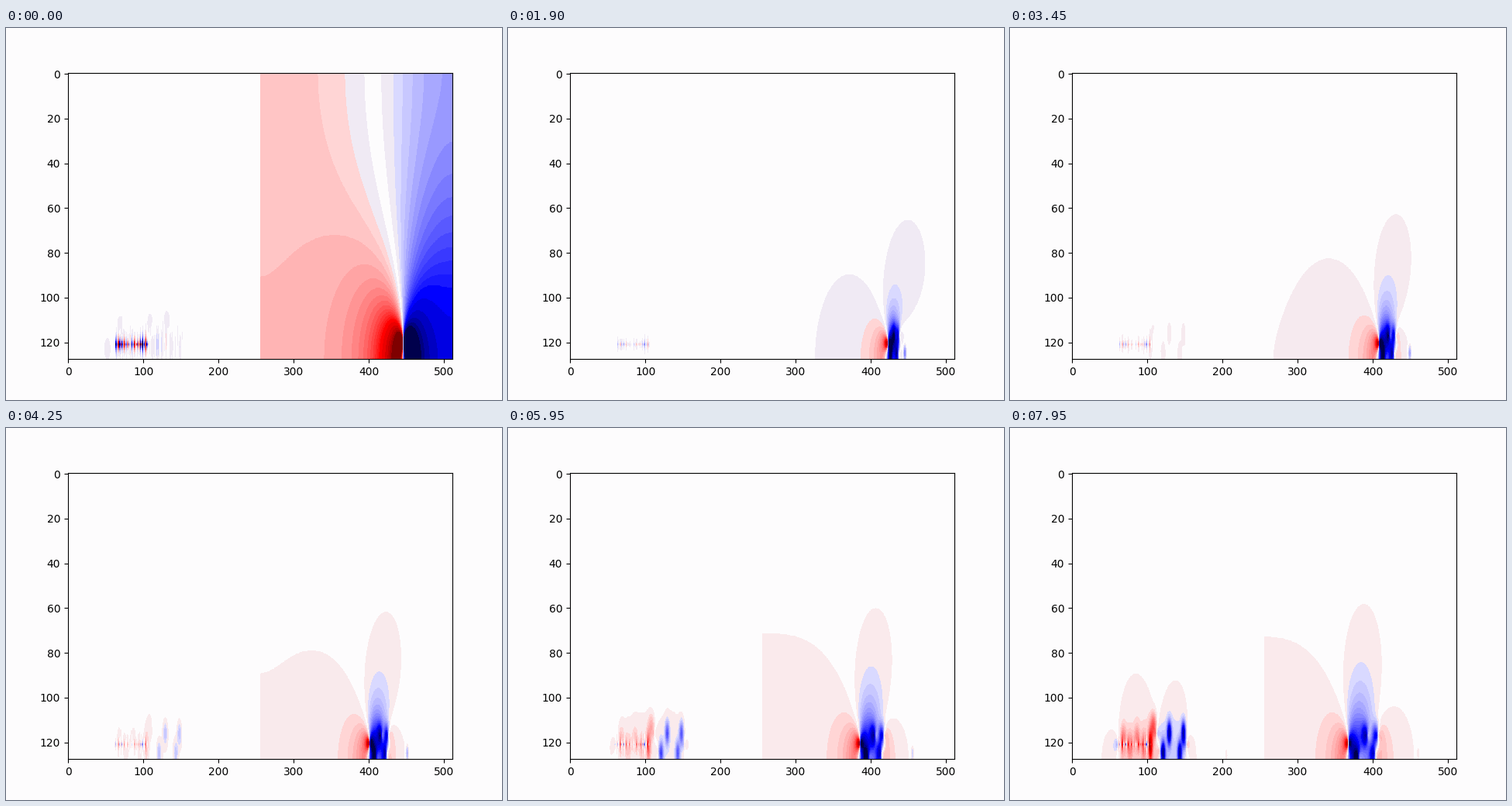
A matplotlib script that plays this animation: 640 by 480 pixels, repeating every 8 s.

```python
import numpy as np
import matplotlib.pyplot as plt
from matplotlib.animation import FuncAnimation
from matplotlib.colors import BoundaryNorm, ListedColormap

W, H = 512, 128
FRAMES, STEP = 160, 50
WAVE = np.pi / H
AXIS = 120.5
PAPER = np.array([253, 252, 253]) / 255
LAVENDER = np.array([240, 234, 244]) / 255
PINK = np.array([250, 234, 236]) / 255

ROWS = np.arange(H)[:, None]
COLS = np.arange(W)[None, :]

# Colour bands, symmetric around zero: fine up to pure hue, coarse beyond
EDGES = np.concatenate([[3 / 128], np.arange(1 / 16, .5, 1 / 32),
                        np.arange(.53, .9, .09), [1.01]])
MIDS = (EDGES[:-1] + EDGES[1:]) / 2
MIDS[-1] = 1
NORM = BoundaryNorm(np.concatenate([-EDGES[::-1], EDGES]), 2 * len(EDGES) - 1)
SEISMIC = plt.get_cmap("seismic")
LOW = SEISMIC(.5 - MIDS[::-1] / 2)[:, :3]
HIGH = SEISMIC(.5 + MIDS / 2)[:, :3]

# Wake charges: position along the channel, height
WAKE = [(.35, 126), (.65, 117), (.92, 125), (1.02, 117)]


def blob(x, y, sx, sy, amp):
    return amp * np.exp(-((COLS - x) / sx) ** 2 - ((ROWS - y) / sy) ** 2)


def make_cloud():
    """Red columns on the left, blue ones on the right, alternating height."""
    cloud = blob(108, 112, 4, 5, .25) + blob(205, 126, 1.5, 3, -.06)
    for i in range(5):
        cloud += blob(68 + 9 * i, 119 + 3 * (i % 2), 3.5, 6, .22)
    cloud += blob(104, 123, 2.5, 6, .45)
    for x, y in [(121, 125), (129, 116), (143, 125), (148, 116)]:
        cloud += blob(x, y, 2.8, 5, -.7)
    return cloud


def make_noise():
    rng = np.random.default_rng(7)
    x = COLS[0]
    line = rng.normal(0, 1, W) * ((x > 62) & (x < 107))
    reach = rng.uniform(.5, 2, W)
    sparks = line * np.exp(-np.abs(ROWS - 121) / reach)
    veil = rng.normal(0, .04, W) - .03 * (x > 107)
    veil = veil * ((x > 62) & (x < 151)) * np.exp(-((ROWS - 121) / 7) ** 2)
    for cx, cy in [(52, 123), (69, 113), (109, 112), (131, 111), (148, 117)]:
        veil += blob(cx, cy, 6, 7, .038)
    return sparks, veil


CLOUD = make_cloud()
SPARKS, VEIL = make_noise()


def kernel(u, y):
    """Field of a charge mirrored in the top and bottom walls."""
    s, c = np.sinh(WAVE * u), np.cosh(WAVE * u) + .0005
    near = np.cos(WAVE * (ROWS - y))
    far = np.cos(WAVE * (ROWS - (2 * H - 1 - y)))
    return s * (.5 / (c - near) + .5 / (c - far))


def charge(q, x, y, wall):
    """Field of a charge in the 256-wide cell that ends at wall."""
    cols = COLS[:, wall - 256:wall]
    total = (wall - x) / 128
    for shift in (0, 512):
        total = total - kernel(cols - x + shift, y)
        total = total + kernel(cols - 2 * wall + x + shift, y)
    return q * total


def field(t):
    fade = np.exp(-t / .25)
    grow = max(0, (t - 2) / 6) ** 1.9
    head = 446 - 9.1 * t - 6 * (1 - np.exp(-t / .7))
    tail = 447 - 5.15 * t
    length = tail - head
    v = np.zeros((H, W))

    # Moving head and its trailing wake
    net = .0185 - .01 * (t / 8) ** 2 + .214 * fade
    pair = .056 * (1 - fade)
    v[:, 256:] = charge(net + pair, head, AXIS, 512)
    for frac, y in WAKE:
        x = head + frac * length
        v[:, 256:] += charge(-pair / 4, x, y, 512)
        v += blob(x - .08 * length, y, 1.5 + length / 12, 5, -6 * pair)
    v += blob(440.8 + 2.47 * t, 125, 2, 3.5,
              -.45 * np.exp(-t / 4.5) * (1 - fade))

    # Growing cloud in the left cell
    if grow > 0:
        for q, x, y in [(-.011, 61, 121), (.011, 112, 116),
                        (.01, 117, 124), (-.01, 152, 121)]:
            v[:, :256] += charge(q * grow, x, y, 256)
    v += grow * CLOUD + fade * VEIL
    v += SPARKS * (.12 + .8 * fade + .2 * grow)
    return np.clip(v, -1, 1)


def bands(t):
    mix = np.clip((t - 1.9) / 2.5, 0, 1)
    faint = LAVENDER + mix * (PINK - LAVENDER)
    return ListedColormap(np.vstack([LOW[:-1], faint, PAPER, faint, HIGH[1:]]))


fig, ax = plt.subplots(figsize=(6.4, 4.8), dpi=100, facecolor=PAPER)
ax.set_facecolor(PAPER)
image = ax.imshow(field(0), cmap=bands(0), norm=NORM, aspect="auto")


def update(i):
    t = i * STEP / 1000
    image.set_data(field(t))
    image.set_cmap(bands(t))
    return [image]


anim = FuncAnimation(fig, update, frames=FRAMES, interval=STEP, repeat=True,
                     repeat_delay=0)
plt.show()
```
